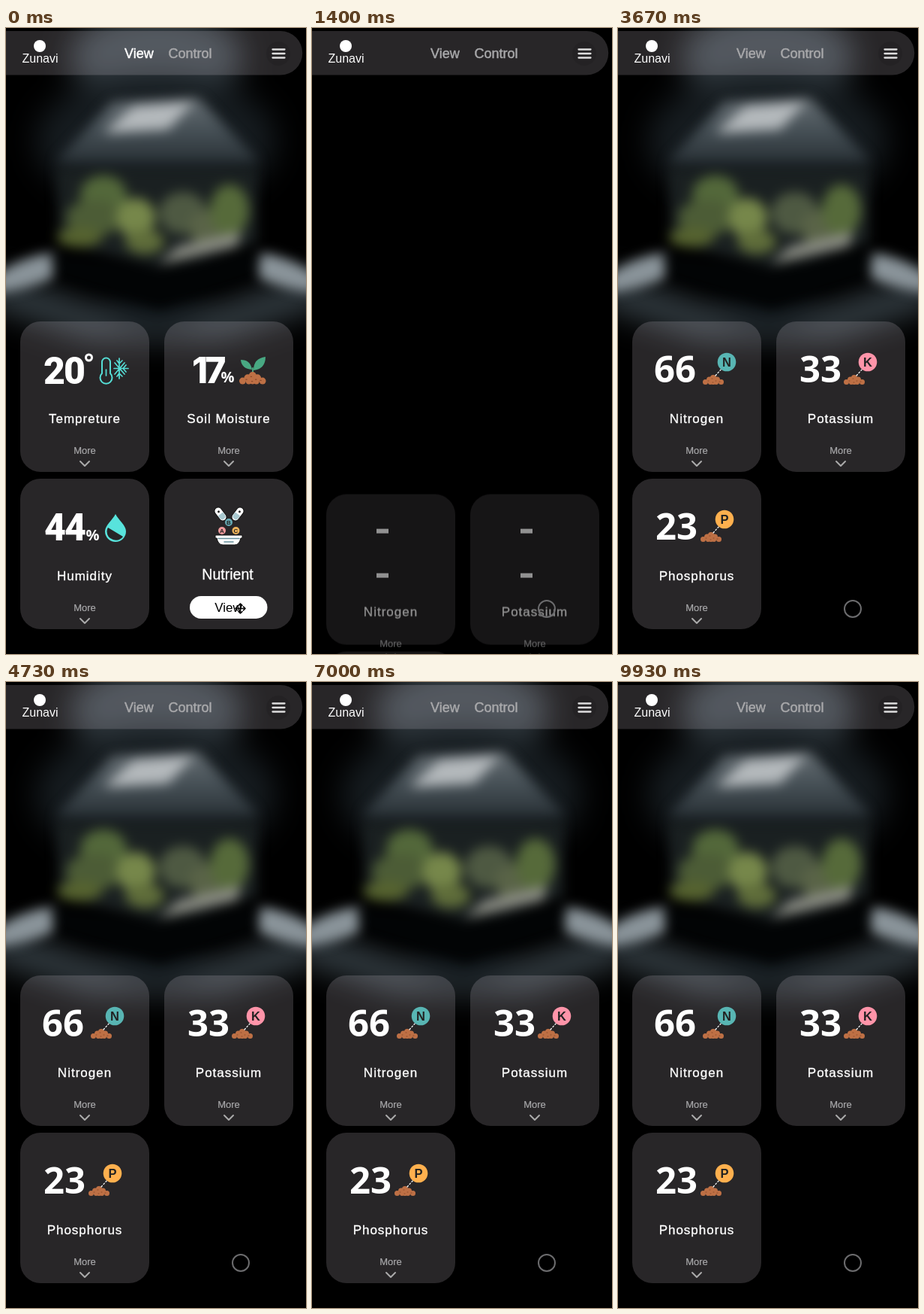
Write an HTML page that moves like this. It is 400x832 px and loops after 10000 ms.

```html
<!DOCTYPE html>
<html lang="en">
<head>
<meta charset="utf-8">
<style>
  html, body { margin: 0; width: 100%; height: 100%; overflow: hidden; background: #000; }
  svg { display: block; width: 400px; height: 832px; font-family: "Liberation Sans", Arial, sans-serif; }
  .panel { fill: #fcf3ff; fill-opacity: .155; }
  .mid { text-anchor: middle; }
  .label { font-size: 17px; letter-spacing: 1px; fill: #fff; stroke: #fff; stroke-width: .35; }
  .more { font-size: 13px; fill: #a8a8aa; stroke: #a8a8aa; stroke-width: .2; }
  .big { font: 900 50px Roboto, sans-serif; letter-spacing: -2px; fill: #fff; }
  .narrow { font: 800 48px Inter, sans-serif; letter-spacing: -4px; fill: #fff; }
  .num { font: 700 49px "Open Sans", sans-serif; fill: #fff; }
  .pct { font: 700 20px "Open Sans", sans-serif; fill: #fff; }
  .tab { font-size: 18px; stroke-width: .45; }
  .line { fill: none; stroke-linecap: round; stroke-linejoin: round; }
</style>
</head>
<body>
<svg viewBox="0 0 400 832">
  <defs>
    <filter id="soft" x="-60%" y="-60%" width="220%" height="220%" color-interpolation-filters="sRGB"><feGaussianBlur stdDeviation="8"/></filter>
    <filter id="wide" x="-60%" y="-60%" width="220%" height="220%" color-interpolation-filters="sRGB"><feGaussianBlur stdDeviation="20"/></filter>
    <linearGradient id="roof" x2="0" y2="1">
      <stop stop-color="#666e73"/><stop offset=".5" stop-color="#465056"/><stop offset="1" stop-color="#2a3237"/>
    </linearGradient>
  </defs>
  <rect width="400" height="832"/>
  <g id="photo">
    <g filter="url(#wide)">
      <ellipse cx="200" cy="38" rx="115" ry="62" fill="#343d43"/>
      <ellipse cx="200" cy="150" rx="160" ry="90" fill="#161c20"/>
      <path class="line" d="M-10 350L115 392H285L410 350" stroke="#364046" stroke-width="42"/>
      <ellipse cx="200" cy="372" rx="60" ry="24" fill="#10161a"/>
    </g>
    <g filter="url(#soft)">
      <path d="M142 98L257 93L338 178L66 178z" fill="url(#roof)"/>
      <path d="M130 140L170 104L252 97L216 135z" fill="#b4b9bc"/>
      <path d="M68 186H335V285L215 320L70 285z" fill="#1a2021"/>
      <path d="M-14 330Q22 302 68 298L62 332Q30 348 -14 352z" fill="#8a949a"/>
      <path d="M414 330Q378 302 332 298L338 332Q370 348 414 352z" fill="#8a949a"/>
      <path d="M60 300L200 318L340 294L336 330L205 374L64 330z" fill="#020405"/>
      <ellipse cx="130" cy="222" rx="31" ry="26" fill="#53683a"/>
      <ellipse cx="118" cy="252" rx="38" ry="24" fill="#4c5c36"/>
      <ellipse cx="98" cy="278" rx="30" ry="13" fill="#56632f"/>
      <ellipse cx="173" cy="252" rx="26" ry="26" fill="#76874a"/>
      <ellipse cx="185" cy="284" rx="26" ry="16" fill="#5f6d3a"/>
      <ellipse cx="236" cy="246" rx="32" ry="28" fill="#4e5942"/>
      <ellipse cx="268" cy="266" rx="24" ry="24" fill="#596347"/>
      <ellipse cx="298" cy="242" rx="26" ry="34" fill="#566a3a"/>
      <path d="M204 314L230 290L314 270L308 290z" fill="#8b8d84"/>
    </g>
  </g>
  <g id="oldPage"></g>
  <g id="newPage"></g>
  <path class="panel" d="M0 4H366a29 29 0 0 1 0 58.500H0z"/>
  <circle cx="45" cy="24" r="8" fill="#fff"/>
  <text class="mid" x="45.500" y="46" font-size="16" fill="#fff">Zunavi</text>
  <text id="tab" class="tab" x="158" y="40">View</text>
  <text class="tab" x="216.500" y="40" fill="#a9a9ab" stroke="#a9a9ab">Control</text>
  <circle cx="363" cy="34" r="16" fill="#000" fill-opacity=".09"/>
  <path class="line" d="M355.500 28.500h16m-16 5.500h16m-16 5.500h16" stroke="#ddd" stroke-width="2.300"/>
  <path id="move" class="line" d="M306 771.500h13M312.500 765v13M308.500 769l-2.500 2.500 2.500 2.500M316.500 769l2.500 2.500-2.500 2.500M310 767.500l2.500-2.500 2.500 2.500M310 775.500l2.500 2.500 2.500-2.500" stroke="#000" stroke-width="1.600"/>
  <circle id="ring" cx="313" cy="772" r="11" fill="none" stroke="#6c6c6e" stroke-width="2"/>
</svg>
<script>
const $ = id => document.getElementById(id);
// The page is swapped at once, its cards rise for a second, data and photo arrive meanwhile
const LOOP = 10000, SWAP = 1070, RISE = 1000, LOADED = 1750, DISTANCE = 536;

const text = (cls, x, y, str, extra = '') => `<text class="${cls}" x="${x}" y="${y}" ${extra}>${str}</text>`;
const line = (d, color, width, extra = '') =>
  `<path class="line" d="${d}" stroke="${color}" stroke-width="${width}" ${extra}/>`;
const dot = (x, y, r, color) => `<circle cx="${x}" cy="${y}" r="${r}" fill="${color}"/>`;
const card = (x, y, inner) =>
  `<g transform="translate(${x} ${y})"><rect class="panel" width="172" height="200" rx="27"/>${inner}</g>`;
const footer = label => text('label mid', 86, 135, label) + text('more mid', 86, 176, 'More') +
  line('M80 186l6 6 6-6', '#aaa', 2);

// Mound of earth, 28 units wide, with its left bottom corner at x, y
const soil = (x, y, scale = 1) => `<g transform="translate(${x} ${y}) scale(${scale})">` +
  [[3.5, -3.5, 3.5], [9, -6.5, 4], [14, -9, 4], [19, -6.5, 4], [24.5, -3.5, 3.5], [10, -3, 3], [18, -3, 3], [14, -4, 4]]
    .map(([cx, cy, r]) => dot(cx, cy, r, '#be7045')).join('') +
  line('M7 -5h1m4 -3h1m4 3h1m4 1h1M13 -3h1', '#8c4a2b', 1) + '</g>';

const thermometer = line('M109 69V54a5.500 5.500 0 0 1 11 0v15a8 8 0 1 1-11 0z', '#55ddd5', 2) +
  line('M114.500 64v8M132 49v27M125 62.500h19M126 55l13 15M126 70l13-15M129 52l3 4 4-4M129 73l3-4 4 4M141 58l-4 4.500 4 4.500', '#55ddd5', 1.700);
const sprout = line('M118 70V62', '#4b9b78', 2) +
  '<path d="M117 64q-14-1-15-13q13 0 15 13zM119 65q0-16 16-18q0 16-16 18z" fill="#48a882"/>' + soil(100, 83.5, 1.270);
const drop = '<path d="M127 47C131 55 141 62 141 70a14 14 0 0 1-28 0C113 62 123 55 127 47z" fill="#58e3dc"/>' +
  '<path d="M117 65L137 77A12 12 0 0 1 115.500 70Q115.500 67 117 65z" fill="#262528"/>';

const capsule = (x, y, angle) => `<g transform="translate(${x} ${y}) rotate(${angle})">
  <rect x="-5" y="-10" width="10" height="20" rx="5" fill="#fff" stroke="#111"/>
  <path d="M-4 0h8v4a4 4 0 0 1-8 0z" fill="#a9c9d0"/>${dot(0, -4, 1.500, '#222')}</g>`;
const ball = (x, y, color, letter) => dot(x, y, 5, color) +
  text('mid', x, y + 3, letter, 'font-size="8" font-weight="bold" fill="#222"');
const nutrients = capsule(75, 47, -38) + capsule(98, 47, 38) +
  ball(77, 69, '#ef9a9c', 'A') + ball(86, 58, '#65aab4', 'B') + ball(95.500, 69, '#efb45b', 'C') +
  '<path d="M68 75H104V79H102Q100 88 94 88H78Q72 88 70 79H68z" fill="#fff" stroke="#111"/>' +
  line('M72 79.500h28M80 84h12', '#638d99', 1.500);

$('oldPage').innerHTML =
  card(19, 390, text('big', 31, 83, '20') + '<circle cx="91.500" cy="48" r="4" fill="none" stroke="#fff" stroke-width="3"/>' +
    thermometer + footer('Tempreture')) +
  card(211, 390, text('narrow', 37, 82, '17') + text('pct', 75.5, 81, '%') + sprout + footer('Soil Moisture')) +
  card(19, 599, text('big', 32, 82, '44') + text('pct', 87.5, 82, '%') + drop + footer('Humidity')) +
  card(211, 599, nutrients + text('mid', 84.5, 134, 'Nutrient', 'font-size="19.500" fill="#fff" stroke="#fff" stroke-width=".3"') +
    '<rect x="34" y="156" width="103.500" height="30" rx="15" fill="#fff"/>' +
    text('mid', 85.500, 177, 'View', 'font-size="17"'));

const element = (x, y, value, label, numX, iconX, letter, color) => card(x, y,
  `<path class="dashes" d="M67 46h16v6h-16zM67 105h16v6h-16z" fill="#fff"/>
  <g class="value">${text('num', numX, 81, value)}${soil(iconX, 84)}
    ${line(`M${iconX + 17} 72l8-9`, '#fff', 1.2, 'stroke-dasharray="2 2.500"')}
    ${dot(iconX + 32, 54, 12.300, color)}
    ${text('mid', iconX + 32, 60, letter, 'font-size="16.500" font-weight="bold" fill="#222"')}</g>
  <g class="footer">${footer(label)}</g>`);

$('newPage').innerHTML =
  element(19, 390, 66, 'Nitrogen', 29, 94, 'N', '#58b5b3') +
  element(211, 390, 33, 'Potassium', 31, 90, 'K', '#ff94a9') +
  element(19, 599, 23, 'Phosphorus', 31, 91, 'P', '#ffb04e');

// The CSS "ease" curve, cubic-bezier(.25, .1, .25, 1)
function ease(x) {
  const bezier = (s, a, b) => 3 * (1 - s) ** 2 * s * a + 3 * (1 - s) * s * s * b + s ** 3;
  let low = 0, high = 1;
  for (let i = 0; i < 20; i++) {
    const s = (low + high) / 2;
    if (bezier(s, .25, .25) < x) low = s; else high = s;
  }
  return bezier(high, .1, 1);
}
const place = (el, opacity, y) => {
  el.setAttribute('opacity', opacity);
  el.setAttribute('transform', `translate(0 ${y})`);
};
const show = (el, on) => el.setAttribute('visibility', on ? 'visible' : 'hidden');

function draw(t) {
  const swapped = t >= SWAP, loaded = t >= LOADED;
  const rise = ease(Math.min(1, Math.max(0, (t - SWAP) / RISE)));
  place($('newPage'), rise, (1 - rise) * DISTANCE);
  $('oldPage').setAttribute('opacity', swapped ? 0 : 1);
  show($('photo'), !swapped || loaded);
  const tabColor = swapped ? '#a9a9ab' : '#fff';
  $('tab').setAttribute('fill', tabColor);
  $('tab').setAttribute('stroke', tabColor);
  show($('move'), !swapped);
  show($('ring'), swapped);
  document.querySelectorAll('.dashes').forEach(el => show(el, !loaded));
  document.querySelectorAll('.value').forEach(el => show(el, loaded));
  document.querySelectorAll('.footer').forEach(el => place(el, 1, loaded ? 0 : 27));
}

const start = performance.now();
function tick() {
  draw((performance.now() - start) % LOOP);
  requestAnimationFrame(tick);
}
tick();
</script>
</body>
</html>
```
